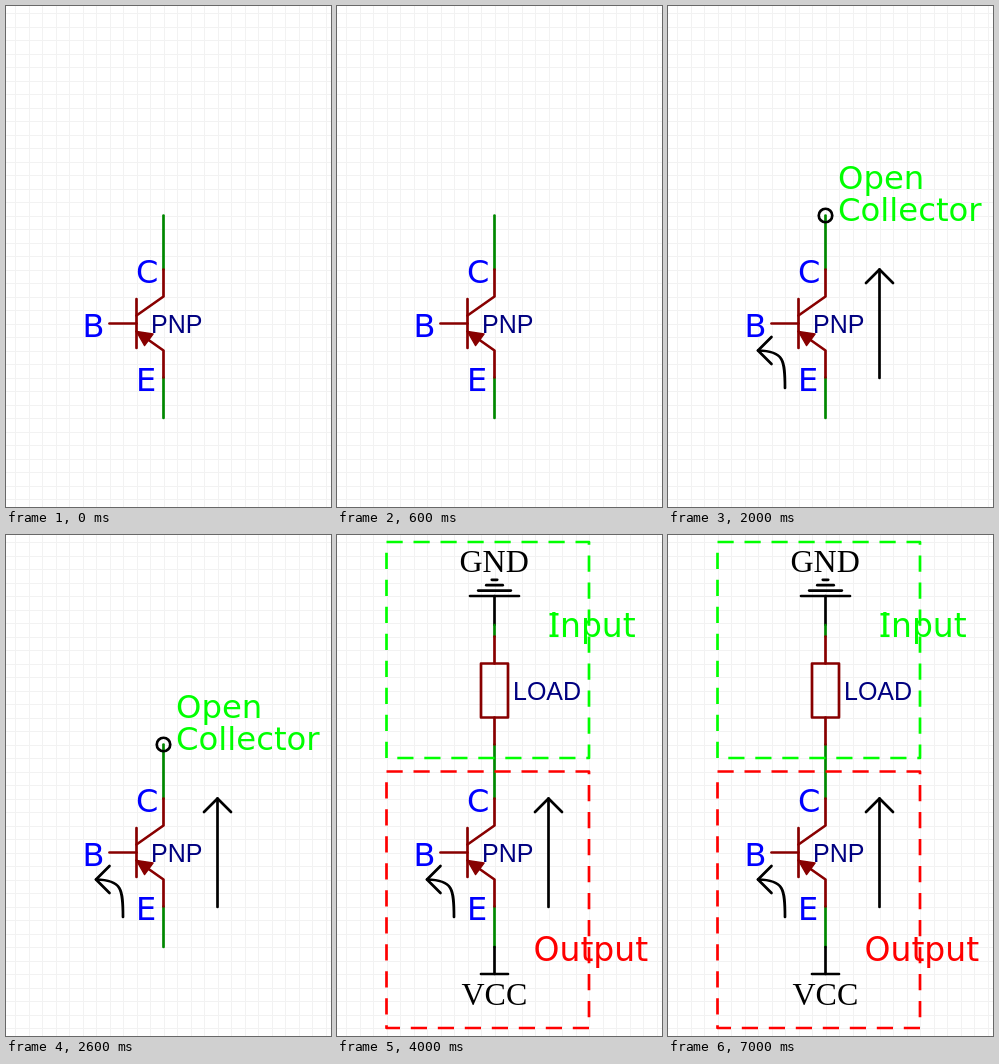
Write an HTML page with a canvas that moves like this. It is 325 px wide and 501 px high and loops after 9000 ms.

```html
<!DOCTYPE html>
<html lang="en">
<head>
<meta charset="utf-8">
<title>PNP switch</title>
<style>
html, body { margin: 0; width: 100%; height: 100%; overflow: hidden; background: #fff; }
canvas { display: block; }
</style>
</head>
<body>
<canvas id="stage" width="325" height="501"></canvas>
<script>
const W = 325, H = 501, LOOP = 9000, STEP = 13.5;
const ctx = document.getElementById('stage').getContext('2d');

const WIRE = '#008800', PART = '#880000', INK = '#000';
const PIN = '#0000ff', LABEL = '#000080', LIME = '#00ff00', RED = '#ff0000';
const SANS = '"DejaVu Sans", sans-serif';
const ARIAL = '"Liberation Sans", sans-serif';
const SERIF = '"Liberation Serif", serif';

function line(color, ...pts) {
  ctx.strokeStyle = color;
  ctx.beginPath();
  for (let i = 0; i < pts.length; i += 2) ctx.lineTo(pts[i], pts[i + 1]);
  ctx.stroke();
}

function text(str, x, y, size, family, color) {
  ctx.font = size + 'px ' + family;
  ctx.fillStyle = color;
  ctx.fillText(str, x, y);
}

function grid() {
  ctx.fillStyle = '#fff';
  ctx.fillRect(0, 0, W, H);
  ctx.fillStyle = '#f2f2f2';
  for (let x = 9; x < W; x += STEP) ctx.fillRect(Math.round(x), 0, 1, H);
  for (let y = 7; y < H; y += STEP) ctx.fillRect(0, Math.round(y), W, 1);
}

function transistor() {
  line(WIRE, 157.5, 209.5, 157.5, 263.5);
  line(WIRE, 157.5, 371.5, 157.5, 412);
  line(PART, 157.5, 263.5, 157.5, 290.5, 130.5, 309.5);
  line(PART, 130.5, 293, 130.5, 342);
  line(PART, 103.5, 317.5, 130.5, 317.5);
  line(PART, 130.5, 325.5, 157.5, 344.5, 157.5, 371.5);
  ctx.fillStyle = PART;
  ctx.beginPath();
  ctx.moveTo(130.5, 325.5);
  ctx.lineTo(147, 328);
  ctx.lineTo(138.5, 339.5);
  ctx.closePath();
  ctx.fill();
  ctx.lineWidth = 1.5;
  ctx.strokeStyle = PART;
  ctx.stroke();
  ctx.lineWidth = 2.7;
  text('C', 130, 277, 32, SANS, PIN);
  text('B', 76.5, 331, 32, SANS, PIN);
  text('E', 130, 385, 32, SANS, PIN);
  text('PNP', 145, 327, 25, ARIAL, LABEL);
}

function currents() {
  line(INK, 211.5, 372, 211.5, 263.5);
  line(INK, 198, 277, 211.5, 263.5, 225, 277);
  ctx.beginPath();
  ctx.moveTo(117, 382);
  ctx.bezierCurveTo(117, 354, 116, 345, 90, 344.5);
  ctx.stroke();
  line(INK, 103.5, 331, 90, 344.5, 103.5, 358);
}

function openEnd() {
  ctx.strokeStyle = INK;
  ctx.beginPath();
  ctx.arc(157.5, 209.5, 6.75, 0, Math.PI * 2);
  ctx.stroke();
  text('Open', 170, 183, 32.3, SANS, LIME);
  text('Collector', 170, 215, 32.3, SANS, LIME);
}

function supply() {
  line(INK, 157.5, 61, 157.5, 90);
  line(WIRE, 157.5, 90, 157.5, 101.5);
  line(PART, 157.5, 101.5, 157.5, 128.5);
  line(PART, 157.5, 182.5, 157.5, 209.5);
  ctx.strokeRect(144, 128.5, 27, 54);
  [24.5, 16.3, 8.2, 2.7].forEach((half, i) => {
    const y = 61 - i * 5.4;
    line(INK, 157.5 - half, y, 157.5 + half, y);
  });
  line(INK, 157.5, 412, 157.5, 439);
  line(INK, 144, 439, 171, 439);
  text('GND', 122.5, 37, 32, SERIF, INK);
  text('VCC', 124.5, 470, 32, SERIF, INK);
  text('LOAD', 176, 165, 25, ARIAL, LABEL);
}

function dashedBox(y, h, color) {
  ctx.save();
  ctx.lineCap = 'butt';
  ctx.setLineDash([16.2, 10.8]);
  ctx.strokeStyle = color;
  ctx.strokeRect(49.5, y, 202.5, h);
  ctx.restore();
}

function zones() {
  dashedBox(7, 216, LIME);
  dashedBox(236.5, 256.5, RED);
  // capital I with crossbars, followed by the rest of the word
  text('I', 212, 102, 33, SANS, LIME);
  ctx.fillRect(212.5, 78, 9, 2.5);
  ctx.fillRect(212.5, 99.5, 9, 2.5);
  text('nput', 223, 102, 33, SANS, LIME);
  text('Output', 196.5, 426, 33, SANS, RED);
}

function draw(t) {
  ctx.lineWidth = 2.7;
  ctx.lineCap = ctx.lineJoin = 'round';
  grid();
  transistor();
  if (t >= 1000) currents();
  if (t >= 2000 && t < 3000) openEnd();
  if (t >= 3000) supply();
  if (t >= 4000) zones();
}

const start = performance.now();
function tick() {
  draw((performance.now() - start) % LOOP);
  requestAnimationFrame(tick);
}
tick();
</script>
</body>
</html>
```
